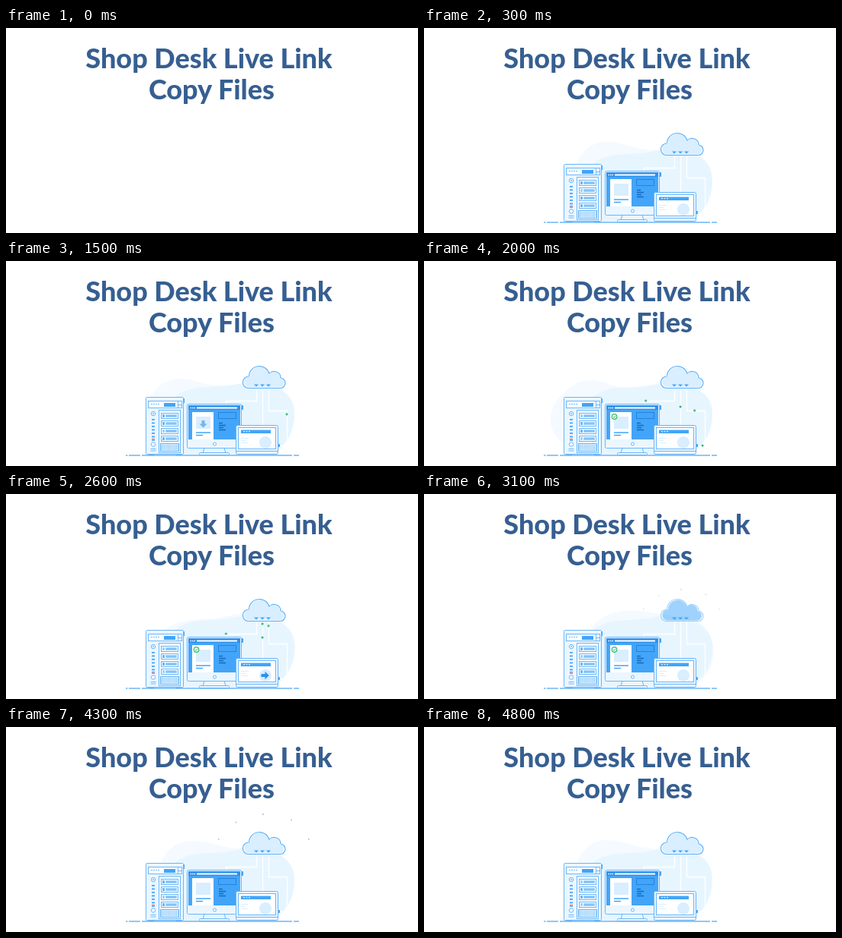
Recreate the animation shown at these times as an HTML page. Size 540 px wide and 270 px high, loop 4900 ms.

```html
<!DOCTYPE html>
<html lang="en">
<head>
<meta charset="utf-8">
<title>Shop Desk Live Link</title>
<style>
html, body { margin: 0; width: 100%; height: 100%; overflow: hidden; background: #fff; }
svg { display: block; width: 540px; height: 270px; }
.title { font: 800 36px Lato, sans-serif; fill: #365f91; text-anchor: middle; }

.scene, .drift, .outline, .solid, .ray, .dot, .down, .check, .next, .led {
  animation: 4900ms linear infinite;
}
.line { fill: none; stroke: #69b7f8; stroke-width: 1; }
.shell { fill: #ebf6ff; stroke: #69b7f8; stroke-width: 1; }
.paper { fill: #fff; }
.pale { fill: #d9eeff; }
.mid { fill: #9fd2fb; }
.blue { fill: #42a5f9; }
.deep { fill: #2f90ec; }
.wire { fill: none; stroke: #fff; stroke-width: 1.3; }
.blob { fill: #cfeaff; fill-opacity: .36; }

.scene { animation-name: appear; animation-timing-function: step-end; }
@keyframes appear { 0% { opacity: 0 } 2%, 100% { opacity: 1 } }

.drift { fill-opacity: .24; animation-name: wobble; }
@keyframes wobble {
  0%, 100% { d: path("M215 255C194 235 192 192 203 172C212 153 231 146 247 149C275 154 288 163 312 160C346 157 377 166 377 196C377 225 368 240 350 255Z") }
  20.4% { d: path("M215 255C200 235 192 190 203 172C212 157 232 149 250 153C275 158 285 163 310 160C345 158 378 168 378 198C378 225 368 240 350 255Z") }
  40.8% { d: path("M215 255C156 240 154 196 188 170C200 156 222 153 242 162C264 172 288 168 310 162C345 158 378 172 378 198C378 225 368 240 350 255Z") }
  53.1% { d: path("M215 255C180 240 180 200 206 180C222 168 240 165 262 165C284 165 292 157 316 158C352 160 379 172 379 200C379 228 368 240 350 255Z") }
  71.4% { d: path("M230 255C216 238 216 202 223 183C230 160 248 146 268 145C290 144 302 155 322 162C355 172 380 182 380 210C380 235 370 245 352 255Z") }
  87.8% { d: path("M215 255C196 235 195 194 205 174C214 157 229 149 247 150C275 152 288 161 312 160C346 159 378 169 378 199C378 227 368 240 350 255Z") }
}

.inner { transform: translate(338px, 154px) scale(.93) translate(-338px, -154px); }
.outline { animation-name: fade; }
.solid { fill: #3fa5f8; opacity: 0; animation-name: charge; }
@keyframes fade { 0%, 61.5% { opacity: 1 } 65.5%, 79.5% { opacity: 0 } 85.5%, 100% { opacity: 1 } }
@keyframes charge { 0%, 61.5% { opacity: 0 } 65.5%, 79.5% { opacity: 1 } 85.5%, 100% { opacity: 0 } }

.ray { stroke: #3ba0f5; stroke-width: 1.7; stroke-dasharray: .5 2; stroke-dashoffset: .5; animation-name: burst; }
@keyframes burst {
  0%, 63% { stroke-dashoffset: .5; opacity: 1 }
  71.4%, 74% { stroke-dashoffset: -.5; opacity: 1 }
  84% { stroke-dashoffset: -.86; opacity: .7 }
  88% { stroke-dashoffset: -.86; opacity: .6 }
  94%, 100% { stroke-dashoffset: -1.1; opacity: 0 }
}

.dot { fill: #2fb573; opacity: 0; }
.right { offset-path: path("M358 243H368V197H344V163"); animation-name: go-right; }
.middle { offset-path: path("M336 215V164"); animation-name: go-middle; }
.left { offset-path: path("M288 188V184H329V165"); animation-name: go-left; }
@keyframes go-right {
  0% { offset-distance: 0%; opacity: 1 } 14.5% { offset-distance: 100%; opacity: 1 }
  14.6%, 100% { offset-distance: 100%; opacity: 0 }
}
@keyframes go-middle {
  0% { offset-distance: 0%; opacity: 1 } 13.9% { offset-distance: 100%; opacity: 1 }
  14%, 100% { offset-distance: 100%; opacity: 0 }
}
@keyframes go-left {
  0% { offset-distance: 0%; opacity: 1 } 10.9% { offset-distance: 100%; opacity: 1 }
  11%, 100% { offset-distance: 100%; opacity: 0 }
}

.down { animation-name: download; }
@keyframes download { 0%, 8% { opacity: 0 } 12%, 29% { opacity: 1 } 33%, 100% { opacity: 0 } }
.check { animation-name: confirm; }
@keyframes confirm { 0%, 32% { opacity: 0 } 36%, 77% { opacity: 1 } 81%, 100% { opacity: 0 } }
.next { animation-name: forward; }
@keyframes forward { 0%, 46% { opacity: 0 } 50%, 58% { opacity: 1 } 61%, 100% { opacity: 0 } }
.led { animation: blink 700ms step-end infinite; }
@keyframes blink { 0%, 100% { fill: #69b7f8 } 50% { fill: #9fd2fb } }
</style>
</head>
<body>
<svg viewBox="0 0 540 270">
  <defs>
    <path id="cloud" d="M317 167.500A7.800 7.800 0 0 1 318.500 152A13.500 13.500 0 0 1 345 148.500A8.500 8.500 0 0 1 360 154A6.800 6.800 0 0 1 360 167.500Z"/>
    <g id="bay">
      <rect class="line" x="203.500" y=".5" width="22" height="7" style="fill:#fff"/>
      <rect class="mid" x="209" y="2" width="15" height="4"/>
      <path d="M210 4H223" stroke="#69b7f8"/>
    </g>
  </defs>

  <text class="title" x="266" y="53">Shop Desk Live Link</text>
  <text class="title" x="269.500" y="94">Copy Files</text>

  <g class="scene">
    <path class="blob" d="M215 255C194 238 200 200 219 181C238 162 268 168 292 164C318 159 340 158 358 168C374 177 378 190 378 202C378 225 368 242 350 255Z"/>
    <path class="blob drift" d="M215 255Z"/>

    <path class="wire" d="M288.500 188V184.500H328.500V165M336.500 216V165M344.500 165V197.500H368.500V243.500H357"/>
    <g id="dots"></g>

    <g class="outline">
      <use href="#cloud" fill="#f5fbff" stroke="#5fb3f8" stroke-width="1.200"/>
      <use href="#cloud" class="inner pale"/>
    </g>
    <use href="#cloud" class="inner solid"/>
    <path class="blue" d="M325 162.500h6l-3 3zM333 162.500h6l-3 3zM341 162.500h6l-3 3z"/>
    <g id="rays"></g>

    <!-- server -->
    <path class="blue" d="M232 181h2v6h-2zM187 254h7v2h-7zM223 254h7v2h-7z"/>
    <rect class="shell" x="183.500" y="179.500" width="49" height="75" rx="1"/>
    <rect class="line" x="186.500" y="184.500" width="44" height="9" style="fill:#fff"/>
    <path class="line" d="M225.500 184.500V193.500M225.500 189.500H230.500"/>
    <path class="line" d="M190 188.500H202" stroke-dasharray="2 1"/>
    <rect class="blue" x="207" y="187" width="15" height="5"/>
    <circle class="line" cx="193" cy="201" r="2.700" style="fill:#fff"/>
    <circle class="line" cx="193" cy="201" r=".7"/>
    <path d="M193 208V238" stroke="#42a5f9" stroke-width="4" stroke-dasharray="1.800 2.700"/>
    <path d="M191 234.500h4" stroke="#ef8fa6" stroke-width="1.800"/>
    <circle class="line" cx="193" cy="241.500" r="2.700" style="fill:#fff"/>
    <path class="line" d="M189.500 247.500H196.500M189.500 250H196.500"/>
    <rect class="line" x="200.500" y="196.500" width="28" height="56" style="fill:#f5fbff"/>
    <g id="bays"></g>
    <rect class="line" x="202.500" y="240.500" width="24" height="10"/>
    <path d="M203 245.500H226" stroke="#9fd2fb" stroke-width="8" stroke-dasharray="1.200 .6"/>

    <!-- monitor -->
    <rect class="blue" x="308" y="190" width="3" height="6" rx="1"/>
    <path class="shell" d="M260 246H286L288 253H258Z"/>
    <rect class="shell" x="253.500" y="252.500" width="39" height="3" rx="1"/>
    <rect class="shell" x="237.500" y="188.500" width="71" height="58" rx="2"/>
    <rect class="blue" x="239" y="190" width="68" height="45"/>
    <rect class="deep" x="239" y="190" width="68" height="6"/>
    <rect class="paper" x="250" y="192.500" width="53" height="2"/>
    <path d="M241.500 193.500H249" stroke="#fff" stroke-width="1.500" stroke-dasharray="1.500 1"/>
    <rect class="paper" x="244" y="199" width="28" height="36"/>
    <rect class="pale" x="249" y="205" width="19" height="16"/>
    <path d="M249 226H268M249 229.500H258" stroke="#42a5f9" stroke-width="1.500"/>
    <path class="down deep" d="M256.500 210h4v4.500h3l-5 5-5-5h3z"/>
    <g class="check">
      <circle cx="249.500" cy="205" r="3.300" fill="#fff" stroke="#35bb67" stroke-width="1.200"/>
      <path d="M247.800 205l1.300 1.400 2.300-2.600" fill="none" stroke="#35bb67"/>
    </g>
    <rect x="278.500" y="199.500" width="23" height="8" fill="none" stroke="#2583dc"/>
    <path d="M279 213.500H284M279 216.500H288M279 219.500H285M279 222.500H288" stroke="#176bbd" stroke-width="1.500"/>
    <circle class="line" cx="273.500" cy="241" r="2" style="fill:#fff"/>

    <!-- laptop -->
    <rect class="blue" x="356" y="241" width="3" height="4" rx="1"/>
    <rect class="shell" x="301.500" y="216.500" width="55" height="38" rx="2"/>
    <rect class="line" x="304.500" y="219.500" width="49" height="28" style="fill:#fff"/>
    <rect class="blue" x="308" y="222.500" width="39" height="4.500"/>
    <path d="M311 224.700H321" stroke="#fff" stroke-dasharray="2 1.500"/>
    <path d="M308 233.500H318M308 236.500H314M308 239.500H317" stroke="#d9eeff"/>
    <circle class="pale" cx="340" cy="239" r="8"/>
    <path class="next deep" d="M334.500 237h5v-3.200l5.300 5.200-5.300 5.200v-3.200h-5z"/>
    <path class="line" d="M301.500 250.500H356.500"/>

    <path d="M157 256H159.500M161 256H176M178 256H375M377 256H384" stroke="#69b7f8" stroke-width="1.500"/>
  </g>
</svg>
<script>
const NS = "http://www.w3.org/2000/svg";
const get = id => document.getElementById(id);
function add(parent, tag, attrs) {
  const el = document.createElementNS(NS, tag);
  for (const key in attrs) el.setAttribute(key, attrs[key]);
  return parent.appendChild(el);
}

// Launch times in ms of the packets on each wire
const launches = { right: [794, 1181, 1568, 1956], middle: [1693, 2013, 2253], left: [1945, 2564] };
for (const wire in launches)
  for (const ms of launches[wire])
    add(get("dots"), "circle", { class: "dot " + wire, r: 1.5, style: `animation-delay:${ms}ms` });

for (let i = 0; i < 4; i++) {
  const y = 200 + i * 10;
  add(get("bays"), "use", { href: "#bay", y });
  add(get("bays"), "rect", { class: "led", x: 205, y: y + 2, width: 3, height: 4, style: `animation-delay:${-i * 200}ms` });
}

const rays = [[288, 151.5, 278, 147.5], [308, 134, 301, 125], [337, 126, 337, 114], [369, 132.5, 374.5, 122], [387, 152, 397.5, 147.5]];
for (const [x1, y1, x2, y2] of rays)
  add(get("rays"), "line", { class: "ray", x1, y1, x2, y2, pathLength: 1 });

// Hold every pose for 100 ms
const anims = document.getAnimations();
anims.forEach(a => a.pause());
let start;
function tick(now) {
  start ??= now;
  const time = Math.floor((now - start) / 100) % 49 * 100;
  anims.forEach(a => a.currentTime = time);
  requestAnimationFrame(tick);
}
requestAnimationFrame(tick);
</script>
</body>
</html>
```
